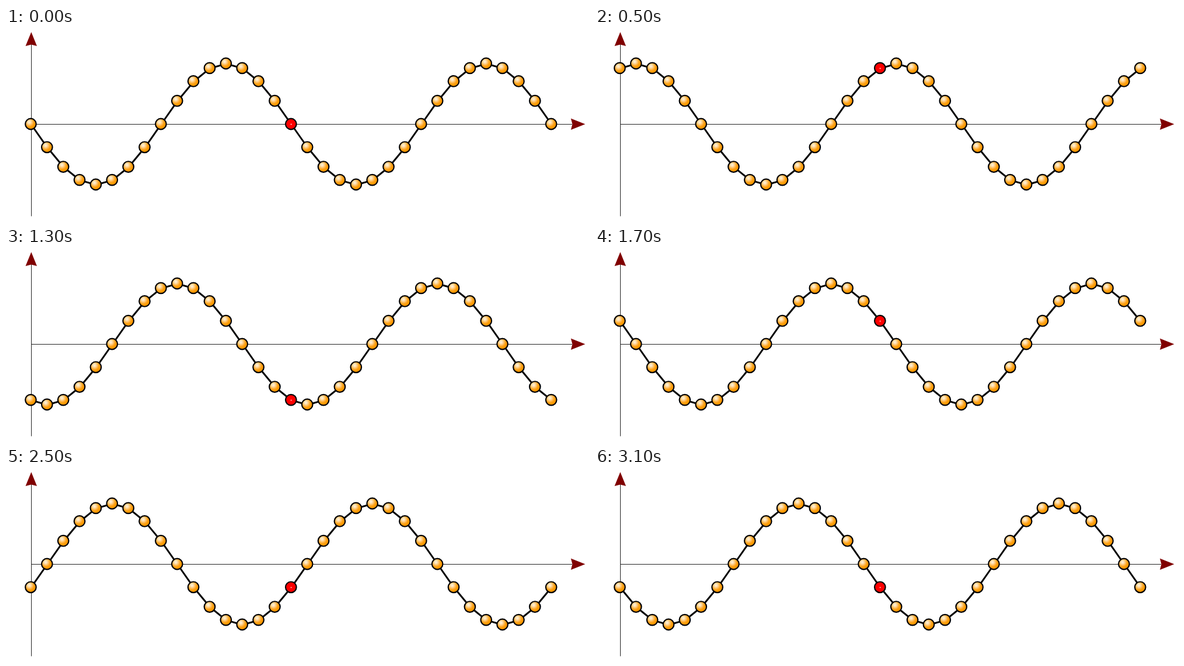
Recreate the animation shown at these times as an HTML page. Size 999 px wide and 330 px high, loop 3200 ms.

```html
<!DOCTYPE html>
<html lang="en">
<head>
<meta charset="utf-8">
<title>Travelling wave</title>
<style>
  html, body { margin: 0; width: 100%; height: 100%; overflow: hidden; background: #fff; }
  svg { display: block; }
</style>
</head>
<body>
<svg width="999" height="330" viewBox="0 0 999 330">
  <defs>
    <radialGradient id="shine" cx="0.37" cy="0.33" r="0.55">
      <stop offset="0" stop-color="#fff4e2"/>
      <stop offset="0.25" stop-color="#ffe0b0"/>
      <stop offset="0.75" stop-color="#ffa21a"/>
      <stop offset="1" stop-color="#ff9900"/>
    </radialGradient>
  </defs>
  <path d="M43.5 28V323.5M43 165.5H970" fill="none" stroke="#222" stroke-width="1"/>
  <path d="M43.3 7L53 31L43.3 28.5L33.5 31ZM992.5 165.3L968 175L970.5 165.3L968 155.5Z" fill="#800000"/>
  <polyline id="string" fill="none" stroke="#000" stroke-width="3" stroke-linejoin="round"/>
  <g id="beads" stroke="#000" stroke-width="2.2"></g>
</svg>
<script>
  const COUNT = 33, PER_WAVE = 16, MARKED = 16;
  const LEFT = 42.4, GAP = 27.87, MIDDLE = 165, AMPLITUDE = 104;
  const STEP_MS = 100, STEPS = 32;

  const string = document.getElementById('string');
  const group = document.getElementById('beads');

  function add(parent, name, attributes) {
    const node = document.createElementNS('http://www.w3.org/2000/svg', name);
    for (const key in attributes) node.setAttribute(key, attributes[key]);
    return parent.appendChild(node);
  }

  const beads = Array.from({ length: COUNT }, (_, i) => {
    const bead = add(group, 'g', {});
    const marked = i === MARKED;
    add(bead, 'circle', { r: 9.3, fill: marked ? '#f00' : 'url(#shine)' });
    if (marked) add(bead, 'circle', { cx: 0.3, cy: 0.5, r: 0.9, fill: '#fff', stroke: 'none' });
    return bead;
  });

  function draw(step) {
    const points = beads.map((bead, i) => {
      const x = LEFT + GAP * i;
      const y = MIDDLE + AMPLITUDE * Math.sin(2 * Math.PI * (i - step) / PER_WAVE);
      bead.setAttribute('transform', `translate(${x.toFixed(2)} ${y.toFixed(2)})`);
      return `${(x + 0.5).toFixed(2)},${(y + 0.5).toFixed(2)}`;
    });
    string.setAttribute('points', points.join(' '));
  }

  const start = performance.now();
  let shown = 0;

  function tick() {
    const step = Math.floor((performance.now() - start) / STEP_MS) % STEPS;
    if (step !== shown) draw(shown = step);
    requestAnimationFrame(tick);
  }

  draw(0);
  requestAnimationFrame(tick);
</script>
</body>
</html>
```
